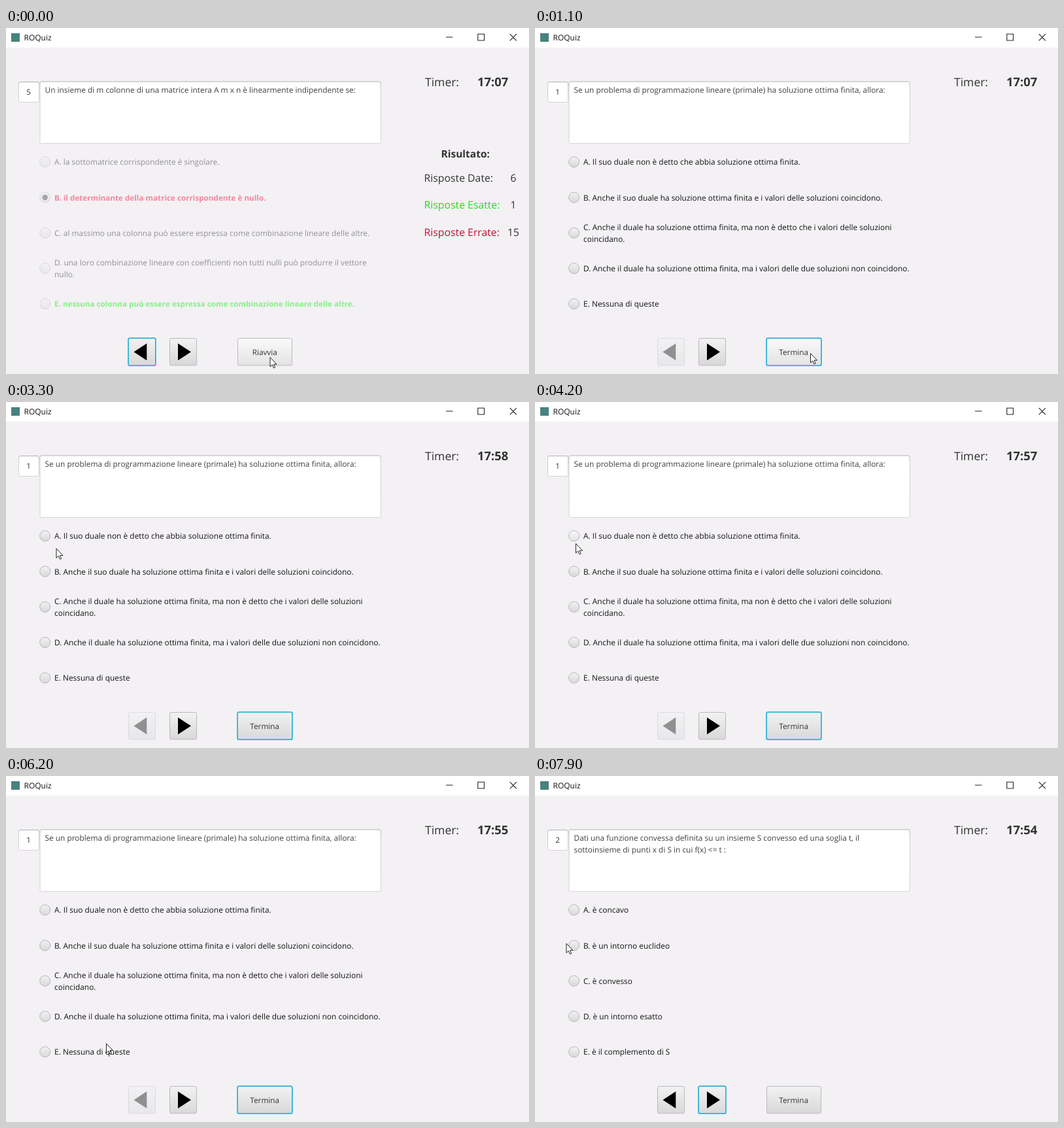
An HTML page that plays this animation: 800 by 529 pixels, repeating every 8 s.

```html
<!DOCTYPE html>
<html lang="it">
<head>
<meta charset="utf-8">
<title>ROQuiz</title>
<style>
  html, body { margin: 0; width: 100%; height: 100%; overflow: hidden; background: #f3f1f4; }
  svg { display: block; }
  text { font-family: "Open Sans", "Noto Sans", sans-serif; font-size: 11.93px; fill: #141414; white-space: pre; text-rendering: geometricPrecision; }
  .bold { font-weight: 700; font-size: 11.7px; }
  .ask { font-size: 11.89px; fill: #404040; }
  .label { font-size: 11.75px; fill: #333; }
  .clock { font-size: 17.5px; fill: #333; }
  .clock.bold { font-size: 18.4px; }
  .score { font-size: 15.8px; fill: #333; }
  .score.bold { font-size: 15.5px; }
  .mid { text-anchor: middle; }
</style>
</head>
<body>
<svg width="800" height="529" viewBox="0 0 800 529">
  <defs>
    <linearGradient id="face" x2="0" y2="1"><stop stop-color="#f3f2f3"/><stop offset="1" stop-color="#d9d8d9"/></linearGradient>
    <linearGradient id="hover" x2="0" y2="1"><stop stop-color="#fbfafb"/><stop offset="1" stop-color="#e4e3e4"/></linearGradient>
    <linearGradient id="edge" x2="0" y2="1"><stop stop-color="#b2b1b3"/><stop offset=".12" stop-color="#cfcdd0"/><stop offset="1" stop-color="#d6d4d7"/></linearGradient>
  </defs>
  <rect width="800" height="30" fill="#fff"/>
  <rect x="8" y="8" width="13" height="13" fill="#48827f"/>
  <text x="27.5" y="19.3" style="font-size:12px">ROQuiz</text>
  <path d="M673 14H683.5M721.8 9.3H731.5V19H721.8ZM770.8 9.2L781 19.4M781 9.2L770.8 19.4" fill="none" stroke="#222" stroke-width="1.1"/>
  <g id="view"></g>
  <path id="cursor" d="M0 0V14.4L3.3 11.3L5.5 16.3L7.7 15.3L5.5 10.6H10Z" fill="#fff" stroke="#222" stroke-width="1" stroke-linejoin="round"/>
</svg>
<script>
const LOOP = 8000, STEP = 100, RESTART = 1000, PICK = 6700, NEXT = 7500;

const review = {
  no: 5, picked: 1, right: 4, done: true,
  ask: ["Un insieme di m colonne di una matrice intera A m x n è linearmente indipendente se:"],
  options: [
    ["A. la sottomatrice corrispondente è singolare."],
    ["B. il determinante della matrice corrispondente è nullo."],
    ["C. al massimo una colonna può essere espressa come combinazione lineare delle altre."],
    ["D. una loro combinazione lineare con coefficienti non tutti nulli può produrre il vettore", "nullo."],
    ["E. nessuna colonna può essere espressa come combinazione lineare delle altre."]
  ]
};
const first = {
  no: 1,
  ask: ["Se un problema di programmazione lineare (primale) ha soluzione ottima finita, allora:"],
  options: [
    ["A. Il suo duale non è detto che abbia soluzione ottima finita."],
    ["B. Anche il suo duale ha soluzione ottima finita e i valori delle soluzioni coincidono."],
    ["C. Anche il duale ha soluzione ottima finita, ma non è detto che i valori delle soluzioni", "coincidano."],
    ["D. Anche il duale ha soluzione ottima finita, ma i valori delle due soluzioni non coincidono."],
    ["E. Nessuna di queste"]
  ]
};
const second = {
  no: 2,
  ask: ["Dati una funzione convessa definita su un insieme S convesso ed una soglia t, il",
        "sottoinsieme di punti x di S in cui f(x) <= t :"],
  options: [["A. è concavo"], ["B. è un intorno euclideo"], ["C. è convesso"],
            ["D. è un intorno esatto"], ["E. è il complemento di S"]]
};

// time, x, y
const path = [
  [0, 404, 503.5], [400, 404, 503.5], [500, 401.5, 497.5], [1000, 401.5, 497.5],
  [1100, 421.5, 497.5], [1500, 424, 501], [2400, 440.5, 480],
  [2600, 420, 482], [3300, 77, 224], [4200, 62.5, 216.5],
  [4300, 76, 232], [4400, 91, 248], [4900, 91, 248], [5200, 70.5, 249], [5300, 70.5, 249],
  [5900, 112, 470], [6200, 153.5, 409],
  [6600, 60, 204], [6700, 60, 204], [7100, 208.5, 420], [7400, 269, 494],
  [7500, 269, 494], [7900, 48, 256], [8000, 48, 256]
];

function cursorAt(t) {
  const i = path.findIndex(p => p[0] > t);
  const [t0, x0, y0] = path[i - 1], [t1, x1, y1] = path[i];
  const k = (t - t0) / (t1 - t0);
  return [x0 + (x1 - x0) * k, y0 + (y1 - y0) * k];
}

const escape = s => s.replace(/</g, "&lt;");
const text = (x, y, s, cls = "", fill = "") =>
  `<text x="${x}" y="${y}" class="${cls}"${fill && ` style="fill:${fill}"`}>${escape(String(s))}</text>`;

const field = (x, y, w, h) =>
  `<rect x="${x}" y="${y}" width="${w}" height="${h}" rx="2.5" fill="#fff" stroke="url(#edge)"/>`;

function button(x, w, content, focused, [cx, cy], disabled) {
  const over = !disabled && cx >= x && cx <= x + w && cy >= 474 && cy <= 516;
  const out = focused ? 0.4 : 0;
  return `<g opacity="${disabled ? 0.4 : 1}">
    <rect x="${x + .5 - out}" y="${474.5 - out}" width="${w - 1 + out * 2}" height="${41.3 + out * 2}" rx="2.5"
      fill="url(#${over ? "hover" : "face"})" stroke="${focused ? "#2fb4d6" : "#b9b8ba"}" stroke-width="${focused ? 1.8 : 1}"/>${content}</g>`;
}

function radio(y, picked, focused, [cx, cy]) {
  const over = cx > 51 && cx < 190 && Math.abs(cy - y) < 12;
  return `<circle cx="59.7" cy="${y}" r="8" fill="url(#${over ? "hover" : "face"})"
      stroke="${focused ? "#2fb4d6" : "#b5b4b6"}" stroke-width="${focused ? 1.8 : 1}"/>` +
    (picked ? `<circle cx="59.7" cy="${y}" r="4.2" fill="#444"/>` : "");
}

function option(lines, i, quiz, picked, focused, cursor) {
  const y = 204.8 + i * 54.25;
  const marked = quiz.done && (i === quiz.right || i === quiz.picked);
  const fill = marked ? (i === quiz.right ? "#00ee00" : "#f5002d") : "";
  const top = y + 4.6 - (lines.length - 1) * 9;
  return `<g opacity="${quiz.done ? 0.44 : 1}">` + radio(y, picked, focused, cursor) +
    lines.map((s, n) => text(74, top + n * 17.8, s, marked ? "bold" : "", fill)).join("") + "</g>";
}

const results = text(665.5, 197.5, "Risultato:", "score bold") +
  [["Date", 6, "#333"], ["Esatte", 1, "#1be01b"], ["Errate", 15, "#d30b32"]].map(([name, n, fill], i) =>
    text(639.5, 234.5 + i * 41.8, `Risposte ${name}:`, "score", fill) +
    text(776, 234.5 + i * 41.8, n, "score mid")).join("");

function render(t) {
  const quiz = t < RESTART ? review : t < NEXT ? first : second;
  const focus = t < RESTART ? "prev" : t < PICK ? "main" : t < NEXT ? "radio" : "next";
  const picked = quiz === first && t >= PICK ? 0 : quiz.picked;
  const cursor = cursorAt(t);
  // the first tick comes one second after the restart
  const clock = t < RESTART + 1000 ? "17:07" : "17:" + (60 - Math.floor((t - RESTART) / 1000));

  view.innerHTML =
    field(19.5, 82.5, 31, 31) + text(34.5, 102.3, quiz.no, "label mid") +
    field(52, 82, 521.3, 94.5) +
    quiz.ask.map((s, i) => text(59.5, 99.3 + i * 17.7, s, "ask")).join("") +
    quiz.options.map((o, i) => option(o, i, quiz, picked === i, focus === "radio" && i === 0, cursor)).join("") +
    button(187, 42, '<path d="M195.5 495.3L215.3 482.3V508.3Z"/>', focus === "prev", cursor, quiz === first) +
    button(250, 42, '<path d="M283 495.3L263 482.3V508.3Z"/>', focus === "next", cursor) +
    button(354, 84, text(395.7, 499.7, quiz.done ? "Riavvia" : "Termina", "label mid"), focus === "main", cursor) +
    text(641, 89.3, "Timer:", "clock") + text(721, 89.3, clock, "clock bold") +
    (quiz.done ? results : "");
  document.getElementById("cursor").setAttribute("transform", `translate(${cursor})`);
}

const view = document.getElementById("view");
let shown = -1;
function tick() {
  const t = Math.floor(performance.now() % LOOP / STEP) * STEP;
  if (t !== shown) render(shown = t);
  requestAnimationFrame(tick);
}
tick();
</script>
</body>
</html>
```
